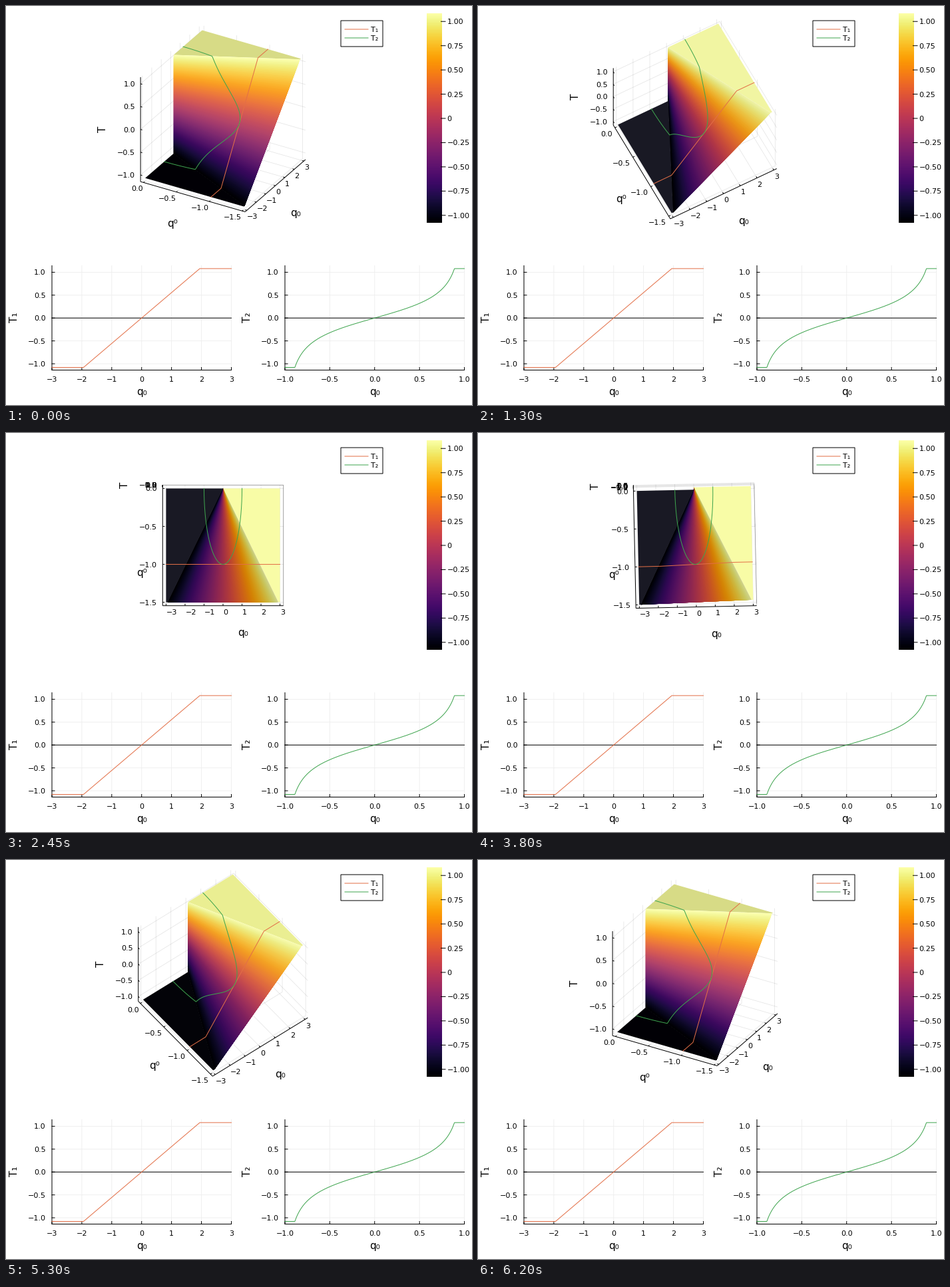
Write a matplotlib script that moves like this. It is 700 px wide and 600 px high and loops after 7500 ms.

```python
import numpy as np
import matplotlib.pyplot as plt
from matplotlib.animation import FuncAnimation
from matplotlib.collections import LineCollection, PolyCollection
from matplotlib.patches import Rectangle

W, H, DPI = 700, 600, 100
FRAMES, INTERVAL, SWEEP = 150, 50, 49
ORANGE, GREEN = "#e36f47", "#3ea44e"
LIM, SLOPE = 1.08, 5 / 9
PX = 72 / DPI
CENTER = np.array([0, -0.75, 0])
HALF = np.array([3.18, 0.795, LIM * 1.06])
LO, HI = CENTER - HALF, CENTER + HALF
SCALE, CX, CY = 90.7, 326, 169
CMAP = plt.get_cmap("inferno")

plt.rcParams["font.family"] = "DejaVu Sans"
fig = plt.figure(figsize=(W / DPI, H / DPI), dpi=DPI, facecolor="white")
ax = fig.add_axes([0, 0, 1, 1])
ax.axis("off")


def number(v, digits):
    return f"{v:.{digits}f}".replace("-", "−")


def put(x, y, s, size=8, ha="center", rot=0):
    """Text whose capitals are centred on (x, y)."""
    shift = 0.365 * size / PX
    dx, dy = (shift, 0) if rot else (0, shift)
    return ax.text(x + dx, y + dy, s, size=size, ha=ha, va="baseline",
                   rotation=rot, rotation_mode="anchor", zorder=6)


def line(xs, ys, color="black", width=1.0, **kw):
    return ax.plot(xs, ys, color=color, lw=width * PX, snap=False, **kw)[0]


def temperature(q, e):
    """Clipped ratio of q to -e."""
    return np.clip(SLOPE * q / np.maximum(-e, 1e-9), -LIM, LIM)


q1 = np.linspace(-3, 3, 601)
e1 = -np.ones_like(q1)
t1 = temperature(q1, e1)
q2 = np.sin(np.linspace(-np.pi / 2, np.pi / 2, 401))
e2 = -np.sqrt(np.maximum(1 - q2 ** 2, 0))
t2 = temperature(q2, e2)


# ---- flat plots -----------------------------------------------------------
def flat_plot(left, xmax, xticks, digits, q, t, color, name):
    width, top, bottom, zero, unit = 269.5, 390.5, 547.5, 469.2, 68.8
    mid = left + width / 2
    sx = lambda v: mid + v * width / 2 / xmax
    sy = lambda v: zero - v * unit
    for v in xticks:
        line([sx(v)] * 2, [top, bottom], "#eeeeee", 0.9, zorder=1)
        line([sx(v)] * 2, [bottom - 4, bottom], zorder=3)
        put(sx(v), 560.5, number(v, digits))
    for v in np.arange(-1, 1.1, 0.5):
        line([left, left + width], [sy(v)] * 2, "#eeeeee", 0.9, zorder=1)
        line([left, left + 4], [sy(v)] * 2, zorder=3)
        put(left - 9.5, sy(v), number(v, 1), ha="right")
    line([left, left, left + width], [top, bottom, bottom], zorder=3)
    line([left, left + width], [zero, zero], zorder=3)
    line(sx(q), sy(t), color, zorder=4)
    put(mid, 579, "q₀", 11)
    put(left - 57.5, zero - 1, name, 11, rot=90)


flat_plot(69, 3, range(-3, 4), 0, q1, t1, ORANGE, "T₁")
flat_plot(419, 1, np.arange(-1, 1.1, 0.5), 1, q2, t2, GREEN, "T₂")

# ---- legend and colour bar ------------------------------------------------
ax.add_patch(Rectangle((503, 22), 63, 39, fc="white", ec="black", lw=PX,
                       snap=False, zorder=4))
for y, color, name in [(35, ORANGE, "T₁"), (48, GREEN, "T₂")]:
    line([509, 544], [y, y], color, zorder=5)
    put(548.5, y, name, ha="left")

ax.imshow(np.linspace(1, 0, 256)[:, None], cmap=CMAP, aspect="auto",
          extent=(631.5, 654, 326, 11.5), interpolation="bilinear", zorder=2)
for v in np.arange(-1, 1.1, 0.25):
    y = CY - 145.75 * v
    line([653.5, 660], [y, y], zorder=3)
    put(662.5, y, number(v, 2) if v else "0", ha="left")

# ---- solid plot -----------------------------------------------------------
levels = np.linspace(-LIM, LIM, 161)[::-1]
edge = 1.5 * levels / SLOPE


def plateau(sign):
    z = sign * LIM
    return np.array([(0, 0, z), (sign * 3, 0, z), (sign * 3, -1.5, z),
                     (sign * LIM * 1.5 / SLOPE, -1.5, z)])


# Each sector reaches under the following ones, so no seams show.
rim = np.stack([edge, np.full_like(edge, -1.5), levels], axis=1)
spine = np.stack([0 * edge, 0 * edge, levels], axis=1)
first = np.arange(len(levels) - 1)
last = np.minimum(first + 8, len(levels) - 1)
sectors = np.stack([spine[first], spine[last], rim[last], rim[first]], axis=1)
faces = np.concatenate([[plateau(1)], sectors, [plateau(-1)]])

mid_t = (levels[:-1] + levels[1:]) / 2
base = CMAP(np.concatenate([[0.985], (mid_t + LIM) / (2 * LIM), [0.01]]))[:, :3]
normals = np.stack([np.full_like(mid_t, -SLOPE / 1.5 * HALF[0] / HALF[2]),
                    -mid_t / 1.5 * HALF[1] / HALF[2],
                    np.ones_like(mid_t)], axis=1)
normals /= np.linalg.norm(normals, axis=1, keepdims=True)
normals = np.concatenate([[(0, 0, 1)], normals, [(0, 0, 1)]])

ticks = [np.arange(-3, 3.1), np.arange(-1.5, 0.1, 0.5), np.arange(-1, 1.1, 0.5)]
start = np.array([LO[0], HI[1], LO[2]])
corner = np.array([LO[0], LO[1], LO[2]])
axis_paths = np.array([
    [corner, (HI[0], LO[1], LO[2])],
    [start, corner],
    [start, (LO[0], HI[1], HI[2])],
])


def tick_paths():
    grid, marks = [], []
    reach = 2 * HALF * 0.016
    for v in ticks[0]:
        grid.append([(v, LO[1], LO[2]), (v, HI[1], LO[2]), (v, HI[1], HI[2])])
        marks.append([(v, LO[1], LO[2]), (v, LO[1] + reach[1], LO[2])])
    for v in ticks[1]:
        grid.append([(LO[0], v, LO[2]), (HI[0], v, LO[2]), (HI[0], v, HI[2])])
        marks.append([(LO[0], v, LO[2]), (LO[0] + reach[0], v, LO[2])])
    for v in ticks[2]:
        grid.append([(LO[0], HI[1], v), (HI[0], HI[1], v), (HI[0], LO[1], v)])
        marks.append([(LO[0], HI[1], v), (LO[0], HI[1] - reach[1], v)])
    return np.array(grid), np.array(marks)


grid_paths, mark_paths = tick_paths()
curves = [np.stack(c, axis=1) for c in [(q1, e1, t1), (q2, e2, t2)]]

grid_art = LineCollection([], colors=[(0, 0, 0, 0.1)], linewidths=0.8 * PX, zorder=1)
axis_art = LineCollection([], colors="black", linewidths=PX, zorder=2)
surface = PolyCollection([], linewidths=0, zorder=3)
for art in (grid_art, axis_art, surface):
    art.set_snap(False)
    ax.add_collection(art, autolim=False)
curve_art = [line([], [], c, zorder=4) for c in (ORANGE, GREEN)]

labels = [put(0, 0, number(v, d), ha=ha)
          for values, d, ha in zip(ticks, (0, 1, 1), ("left", "right", "right"))
          for v in values]
titles = [put(0, 0, "q₀", 11), put(0, 0, "q⁰", 11), put(0, 0, "T", 11, rot=90)]
ax.set_xlim(0, W)
ax.set_ylim(H, 0)


def project(points, az, el):
    u = (points - CENTER) / HALF * SCALE
    x, y, z = u[..., 0], u[..., 1], u[..., 2]
    depth = x * np.sin(az) + y * np.cos(az)
    return np.stack([CX + x * np.cos(az) - y * np.sin(az),
                     CY - depth * np.sin(el) - z * np.cos(el)], axis=-1)


def shade(az, el):
    """Headlight: facing parts gain a bluish glow, slanted ones lose light."""
    view = np.array([-np.cos(el) * np.sin(az), -np.cos(el) * np.cos(az), np.sin(el)])
    facing = normals @ view
    light = np.clip(0.45 + 0.57 * facing, 0, 1)
    light[[0, -1]] = 0.74 + 0.26 * view[2]
    rgb = base * light[:, None]
    glow = np.clip((facing - 0.78) / 0.1, 0, 1)[:, None] * [0.095, 0.095, 0.12]
    return np.clip(rgb + glow * (1 - rgb), 0, 1)


def update(i):
    turn = np.clip(min(i, 124 - i) / SWEEP, 0, 1)
    az, el = np.radians(60 - 60 * turn), np.radians(30 + 60 * turn)
    view = lambda p: project(p, az, el)

    grid_art.set_segments(list(view(grid_paths)))
    marks, axes = view(mark_paths), view(axis_paths)
    axis_art.set_segments(list(axes) + list(marks))
    surface.set_verts(list(view(faces)))
    surface.set_facecolor(shade(az, el))
    for art, curve in zip(curve_art, curves):
        art.set_data(*view(curve).T)

    side = 1 - np.sin(az)
    offsets = [(0.5, 9), (-8 * side ** 1.3, 9 * (1 - side ** 5)), (-8, 0)]
    kinds = np.repeat([0, 1, 2], [len(t) for t in ticks])
    for label, kind, (x, y) in zip(labels, kinds, marks[:, 0]):
        label.set_position((x + offsets[kind][0], y + offsets[kind][1] + 4.05))
    shifts = [(30.5, 45.5), (-31, 45.5), (-52, 0)]
    for title, (x, y), (dx, dy) in zip(titles, axes.mean(axis=1), shifts):
        title.set_position((x + dx, y + dy))
    return []


anim = FuncAnimation(fig, update, frames=FRAMES, interval=INTERVAL,
                     init_func=lambda: update(0), repeat=True, repeat_delay=0)
plt.show()
```
